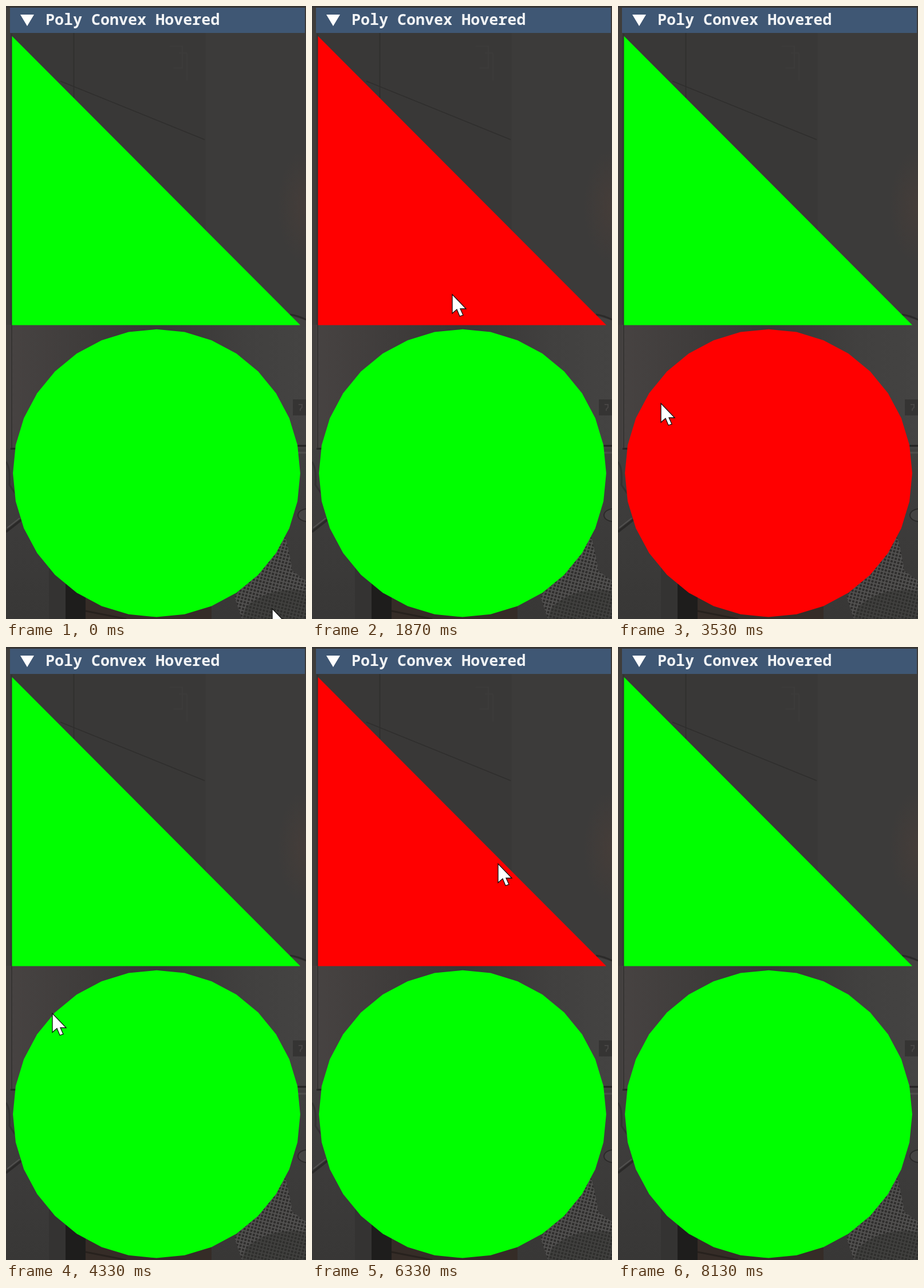
An HTML page that plays this animation: 524x1069 px, repeating every 8870 ms.

```html
<!DOCTYPE html>
<html lang="en">
<head>
<meta charset="utf-8">
<title>Poly Convex Hovered</title>
<style>
  html, body { margin: 0; width: 100%; height: 100%; overflow: hidden; background: #3a3938; }
  svg { display: block; width: 100vw; height: 100vh; }
  text { font: 600 26.7px "Noto Sans Mono", "DejaVu Sans Mono", monospace; fill: #f2f4f6; }
</style>
</head>
<body>
<svg viewBox="0 0 524 1069">
  <defs>
    <linearGradient id="room" x2="1" y2="0">
      <stop offset="0" stop-color="#474342"/>
      <stop offset=".5" stop-color="#383635"/>
      <stop offset=".8" stop-color="#41403f"/>
      <stop offset="1" stop-color="#444342"/>
    </linearGradient>
    <linearGradient id="cabinet" x2="0" y2="1">
      <stop offset="0" stop-color="#403f3e"/>
      <stop offset="1" stop-color="#383736"/>
    </linearGradient>
    <radialGradient id="glow">
      <stop offset="0" stop-color="#453d39"/>
      <stop offset="1" stop-color="#453d39" stop-opacity="0"/>
    </radialGradient>
    <pattern id="weave" width="6" height="6" patternUnits="userSpaceOnUse" patternTransform="rotate(14)">
      <rect width="6" height="6" fill="#535251"/>
      <rect width="4" height="4" fill="#2f2e2d"/>
    </pattern>
  </defs>

  <!-- dimmed room -->
  <rect width="524" height="560" fill="#393837"/>
  <rect x="349" width="175" height="560" fill="#3c3b3a"/>
  <ellipse cx="524" cy="350" rx="50" ry="100" fill="url(#glow)"/>
  <path d="M118.5 47V160M95 131L347 233" fill="none" stroke="#2f2e2d" stroke-width="1.6"/>
  <path d="M286 70h22v38h-16M302 82h14v48" fill="none" stroke="#3c3b3a" stroke-width="2"/>
  <rect y="556" width="524" height="513" fill="url(#room)"/>
  <path d="M470 556L498 541L524 548V560z" fill="#444241"/>
  <path d="M496 538Q510 540 524 547" fill="none" stroke="#2b2a29" stroke-width="3"/>
  <rect x="501" y="686" width="23" height="28" fill="#353433"/>
  <path d="M511 695h6v5l-3 3v3" fill="none" stroke="#474544" stroke-width="2"/>
  <rect y="772" width="524" height="297" fill="url(#cabinet)"/>
  <path d="M508 767H524M8 772H18" stroke="#242322" stroke-width="3"/>
  <path d="M508 779H524" stroke="#4f4e4c" stroke-width="3"/>
  <path d="M0 795Q8 805 6 835L16 850" fill="none" stroke="#333231" stroke-width="3"/>
  <path d="M0 917L28 895" stroke="#2a2928" stroke-width="4"/>
  <path d="M2 910L24 893" stroke="#525150" stroke-width="2"/>
  <rect x="75" y="980" width="29" height="89" fill="#343332"/>
  <rect x="104" y="995" width="35" height="74" fill="#1e1d1c"/>
  <rect x="139" y="1025" width="220" height="44" fill="#352c27"/>
  <path d="M139 1055L210 1069" stroke="#27211d" stroke-width="3"/>
  <path d="M399 1030L486 920Q494 945 500 985L524 1002V1069H412z" fill="url(#weave)"/>
  <path d="M418 1050Q455 1012 524 1020V1069H412z" fill="#30302f" opacity=".5"/>
  <ellipse cx="526" cy="888" rx="16" ry="11" fill="#454443" stroke="#2b2a29" stroke-width="2"/>
  <path d="M0 0H7V772H0z" fill="#423f3e" opacity=".7"/>
  <path d="M10 48V772" stroke="#302f2e" stroke-width="1.5"/>

  <!-- window -->
  <rect width="524" height="3" fill="#353433"/>
  <rect x="7" y="3" width="515" height="44" fill="#3f5774"/>
  <path d="M25 15H49L37 35z" fill="#fff"/>
  <text x="69" y="33">Poly Convex Hovered</text>
  <polygon id="tri"/>
  <polygon id="disc"/>
  <path id="cursor" d="M0 0V33L8 26L13 38L19 36L14 25H24z" fill="#fff" stroke="#111" stroke-width="1.3"/>
</svg>
<script>
const TICK = 200 / 3, LOOP = 8870, GONE = 122;
const LIME = '#00ff00', RED = '#ff0000';
const el = id => document.getElementById(id);

const shapes = {
  tri: [[10.5, 52.5], [514, 556.5], [10.5, 556.5]],
  disc: Array.from({ length: 32 }, (_, i) => {
    const a = i * Math.PI / 16;
    return [263 + 250.9 * Math.cos(a), 814.7 + 250.9 * Math.sin(a)];
  })
};
for (const id in shapes) el(id).setAttribute('points', shapes[id].join(' '));

// pointer stops: tick, x, y and how far the way there bows to its left
const stops = [
  [0, 465, 1051], [3, 470, 1085], [18, 446, 630, 110], [38, 211, 267, 100],
  [45, 5, 520], [53, 75, 693], [60, 140, 760], [71, 4, 479], [73, 4, 479],
  [75, 34, 478], [86, 330, 330], [87, 330, 330], [95, 325, 378],
  [107, 450, 622], [111, 400, 520], [119, 500, 1035], [121, 380, 960]
];

function pointer(tick) {
  const found = stops.findIndex(s => s[0] > tick);
  const i = found < 0 ? stops.length - 1 : found;
  const [t0, x0, y0] = stops[i - 1], [t1, x1, y1, bow = 0] = stops[i];
  const u = Math.min(1, (tick - t0) / (t1 - t0));
  const ease = u * u * (3 - 2 * u);
  const dx = x1 - x0, dy = y1 - y0;
  const side = bow * Math.sin(Math.PI * ease) / (Math.hypot(dx, dy) || 1);
  return [x0 + dx * ease + dy * side, y0 + dy * ease - dx * side];
}

// convex test: the point lies on the same side of every edge
const inside = (pts, [x, y]) => pts.every(([ax, ay], i) => {
  const [bx, by] = pts[(i + 1) % pts.length];
  return (bx - ax) * (y - ay) - (by - ay) * (x - ax) >= 0;
});

function draw(ms) {
  const tick = Math.floor((ms % LOOP + 4) / TICK);
  const shown = tick < GONE;
  const at = pointer(tick);
  for (const id in shapes)
    el(id).setAttribute('fill', shown && inside(shapes[id], at) ? RED : LIME);
  el('cursor').setAttribute('transform', `translate(${at.map(Math.round)})`);
  el('cursor').setAttribute('visibility', shown ? 'visible' : 'hidden');
}

const start = performance.now();
function loop() {
  draw(performance.now() - start);
  requestAnimationFrame(loop);
}
loop();
</script>
</body>
</html>
```
